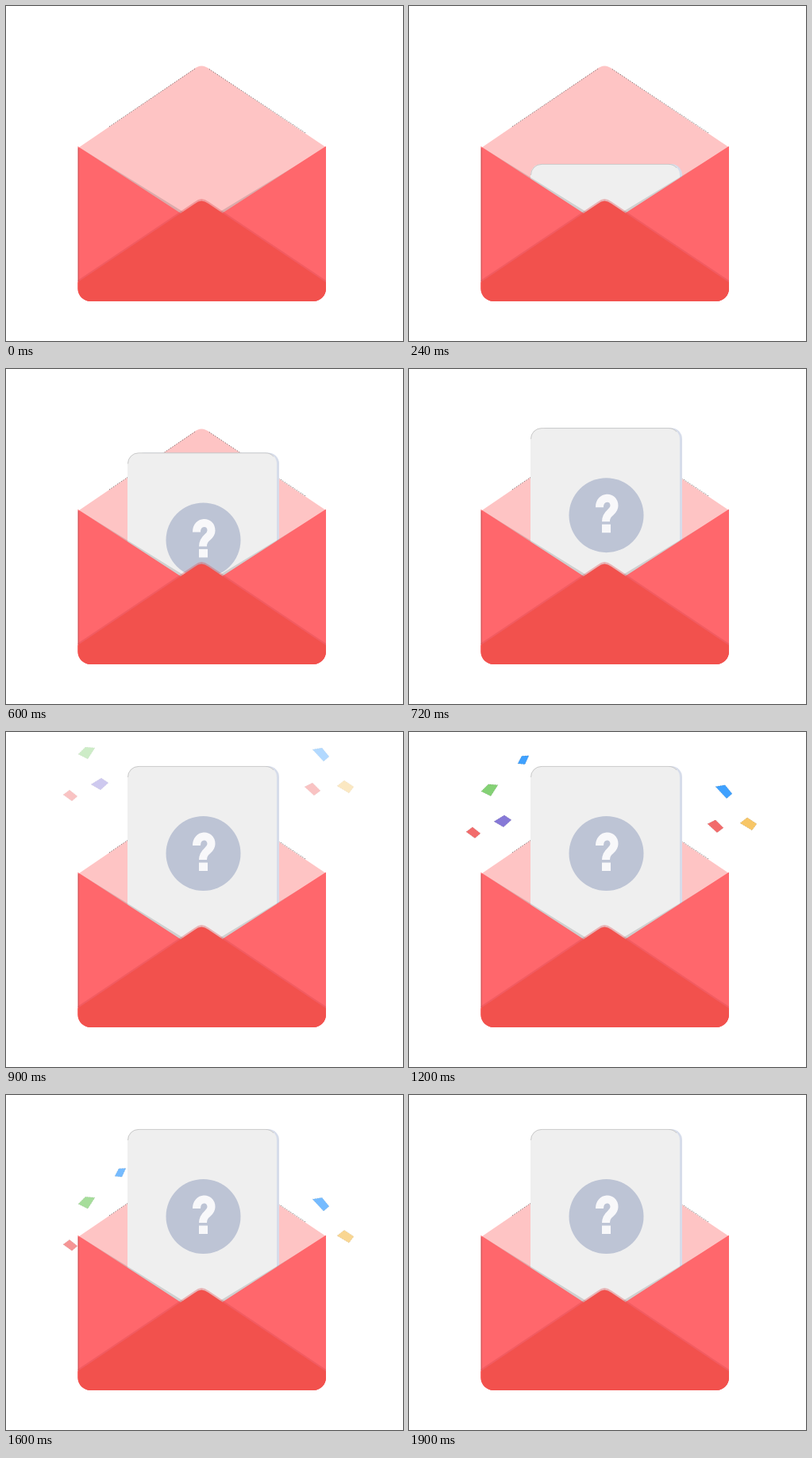
These frames come from a looping animation (500 by 422 pixels, 2000 ms). An HTML page:

```html
<!DOCTYPE html>
<html lang="en">
<head>
<meta charset="utf-8">
<title>Envelope</title>
<style>
  html, body { margin: 0; width: 100%; height: 100%; overflow: hidden; background: #fff; }
  svg { display: block; }
</style>
</head>
<body>
<svg width="500" height="422" viewBox="0 0 500 422">
  <defs>
    <clipPath id="inside"><path d="M0 0H500V340H0Z"/></clipPath>
    <clipPath id="body"><path d="M90.5 177L246 60L403 177V356A16 16 0 0 1 387 372H106.500A16 16 0 0 1 90.500 356Z"/></clipPath>
    <path id="front" d="M86 351L238 249Q246 242 255 249L407 351V376H86Z"/>
  </defs>

  <g id="confetti" stroke="#0006" stroke-width=".6" stroke-dasharray="1 2"></g>

  <!-- open flap -->
  <path fill="#fec4c4" d="M92 178L236 80Q246 71 257 80L403 178L246 290Z"/>
  <path fill="none" stroke="#222" stroke-width=".7" stroke-dasharray="1 2"
        d="M130 152L238 79M256 79.500L378 160.500"/>

  <g clip-path="url(#inside)">
    <g id="card">
      <rect x="160" width="184" height="260" rx="14" fill="#d6dcea"/>
      <rect x="153" width="188" height="260" rx="14" fill="#efefef"/>
      <path d="M153.500 14A13.500 13.500 0 0 1 167 .4H327A13.500 13.500 0 0 1 337 5" fill="none" stroke="#0003" stroke-width=".8"/>
      <circle cx="248.500" cy="110" r="47" fill="#bdc4d5"/>
      <path d="M240 100C240 85 258.500 85 258.500 98C258.500 107 248 106 248 118" fill="none" stroke="#f8f8fa" stroke-width="10"/>
      <rect x="243" y="121.500" width="11" height="10.500" fill="#f8f8fa"/>
    </g>
  </g>

  <!-- pocket -->
  <g clip-path="url(#body)">
    <path fill="#0002" d="M92 178L226 261V267ZM403 178L268 260V267Z"/>
    <path fill="#ff676c" d="M90 176.500L246 278L403 176.500V372H90Z"/>
    <path fill="none" stroke="#0003" stroke-width="1.500" d="M91 179V347"/>
    <use href="#front" y="-2.500" fill="#d9454a" opacity=".35"/>
    <use href="#front" fill="#f2514d"/>
  </g>
</svg>
<script>
const FALL = 15.6;
const card = document.getElementById('card');
const confetti = document.getElementById('confetti');

const pieces = [
  ['#6cc85a', '91 106 100 97 112 98 103 112'],
  ['#6f5fd0', '107 144 120 136 129 142 119 151'],
  ['#f04f4f', '72 157 80 151 90 159 83 165'],
  ['#1a8fff', '137 71 142 61.5 151 61 146 72'],
  ['#1a8fff', '386 100 398 98 407 109 400 115'],
  ['#f04f4f', '376 147 386 142 396 152 388 158'],
  ['#f6bb4a', '417 146 426 139 438 147 432 155'],
];
confetti.innerHTML = pieces
  .map(([color, points]) => `<polygon fill="${color}" points="${points}"/>`)
  .join('');

// Quick 60 ms steps first, then slower 100 ms steps.
const stepAt = t => t < 900 ? Math.floor(t / 60) : 15 + Math.floor((t - 900) / 100);

function draw() {
  const step = stepAt(performance.now() % 2000);
  const top = 261.4 - FALL * Math.min(step, 14);
  card.setAttribute('transform', `translate(0 ${top})`);

  // Confetti falls steadily while fading in and out.
  const fade = Math.min(1, (step - 13) / 6, (25 - step) / 5);
  confetti.setAttribute('transform', `translate(0 ${FALL * (step - 20)})`);
  confetti.setAttribute('opacity', Math.max(0, fade));
  requestAnimationFrame(draw);
}
draw();
</script>
</body>
</html>
```
